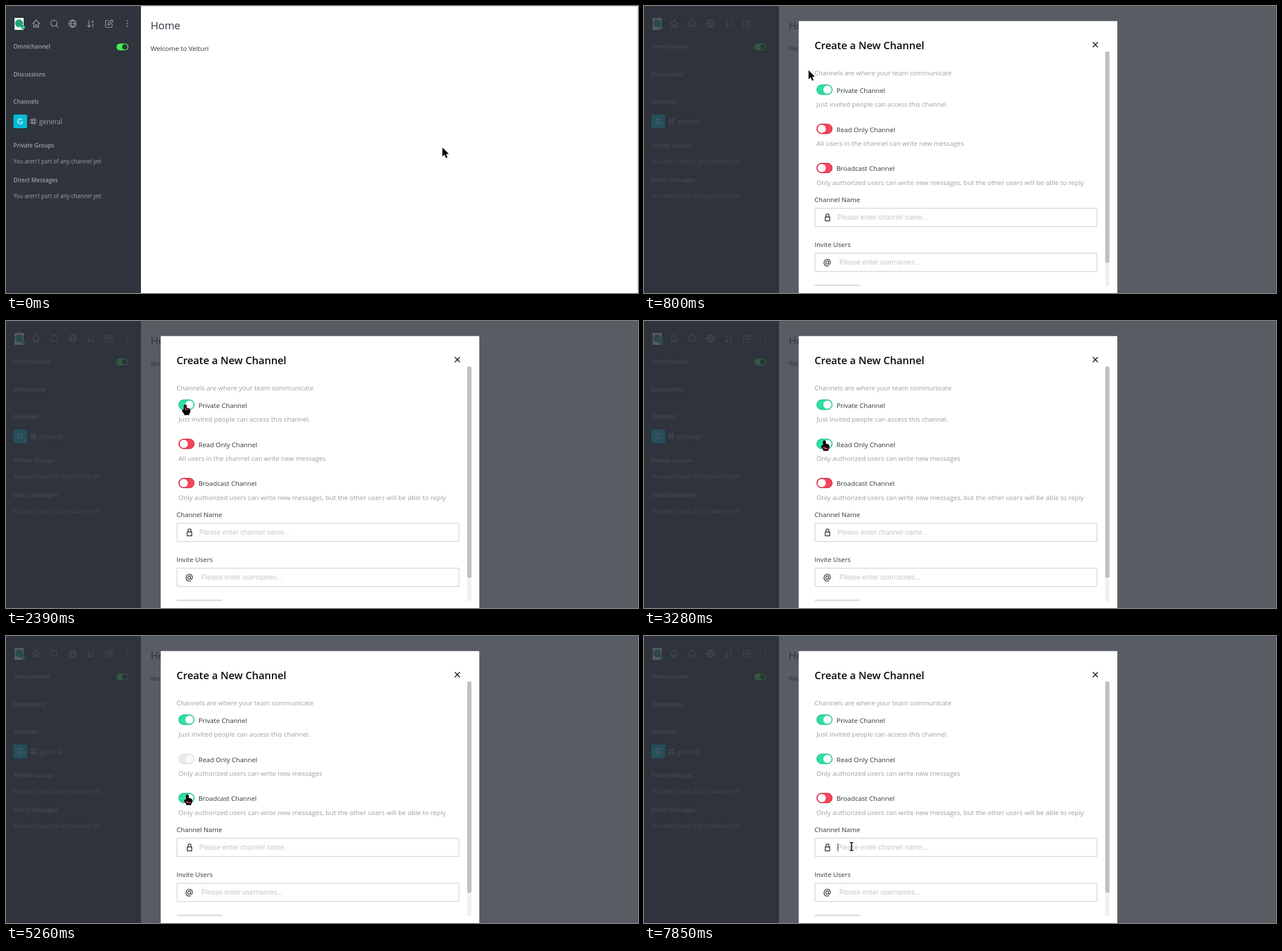
These frames come from a looping animation (1110 px wide and 505 px high, 8 s). An HTML page with a canvas:

```html
<!DOCTYPE html>
<html lang="en">
<head>
<meta charset="utf-8">
<title>Create a channel</title>
<style>
html, body { margin: 0; width: 100%; height: 100%; overflow: hidden; background: #fff; }
canvas { display: block; }
</style>
</head>
<body>
<canvas id="stage" width="1110" height="505"></canvas>
<script>
const ctx = document.getElementById('stage').getContext('2d');
const LOOP = 8000;
const SANS = '"Open Sans", "Noto Sans", sans-serif';
const ARIAL = '"Liberation Sans", sans-serif';
const DARK = '#2f343d', MUTED = '#9ea2a8', HINT = '#9b9da3';
const GREEN = [45, 224, 165], RED = [245, 69, 92];

// Each step lists only what changes at that time.
const START = { cursor: 'arrow', x: 766.5, y: 249, click: 0, menu: 0, modal: 0,
  priv: 1, read: 0, cast: 0, locked: 0, caret: 0 };
const STEPS = [
  [70, { x: 540, y: 166 }],
  [250, { cursor: 'hand', x: 182, y: 32 }],
  [440, { click: 1, menu: 1 }],
  [620, { x: 214.5, y: 81.5 }],
  [800, { cursor: 'arrow', x: 289, y: 113, click: 0, menu: 0, modal: 1 }],
  [980, { cursor: 'hand', x: 314, y: 147, caret: 1 }],
  [1330, { click: 1, caret: 0 }],
  [1680, { click: 0, priv: 0.4 }],
  [1860, { priv: 0 }],
  [2210, { click: 1 }],
  [2390, { click: 0, priv: 1 }],
  [2570, { x: 316, y: 210 }],
  [2750, { click: 1 }],
  [2930, { click: 0, read: 0.6 }],
  [3110, { read: 1 }],
  [3460, { click: 1 }],
  [3810, { click: 0, read: 0 }],
  [3990, { y: 243 }],
  [4180, { x: 317.5, y: 277 }],
  [4360, { y: 279 }],
  [4570, { click: 1 }],
  [4890, { click: 0, cast: 0.6, read: 1, locked: 1 }],
  [5080, { cast: 1 }],
  [6960, { click: 1 }],
  [7140, { click: 0, cast: 0, locked: 0 }],
  [7320, { cursor: 'beam', x: 352, y: 352 }],
  [7500, { x: 364.5, y: 370.5, click: 1, caret: 1 }],
  [7850, { click: 0 }]
];

function stateAt(time) {
  const state = { ...START };
  for (const [at, change] of STEPS) if (time >= at) Object.assign(state, change);
  return state;
}

function text(str, x, middle, size, color, weight = 400, family = SANS) {
  ctx.font = `${weight} ${size}px ${family}`;
  ctx.fillStyle = color;
  ctx.fillText(str, x, middle + size * 0.36);
}

function rect(x, y, w, h, color, radius = 0) {
  ctx.fillStyle = color;
  ctx.beginPath();
  ctx.roundRect(x, y, w, h, radius);
  ctx.fill();
}

function outline(x, y, w, h, color, width, radius) {
  ctx.strokeStyle = color;
  ctx.lineWidth = width;
  ctx.beginPath();
  ctx.roundRect(x + width / 2, y + width / 2, w - width, h - width, radius);
  ctx.stroke();
}

function disc(x, y, r, color) {
  ctx.fillStyle = color;
  ctx.beginPath();
  ctx.arc(x, y, r, 0, Math.PI * 2);
  ctx.fill();
}

function icon(path, x, y, color = MUTED, width = 1.2) {
  ctx.save();
  ctx.translate(x, y);
  ctx.strokeStyle = color;
  ctx.lineWidth = width;
  ctx.lineCap = ctx.lineJoin = 'round';
  ctx.stroke(new Path2D(path));
  ctx.restore();
}

const ring = (x, y, r) => `M${x - r} ${y}a${r} ${r} 0 1 0 ${2 * r} 0a${r} ${r} 0 1 0 ${-2 * r} 0`;

const ICONS = {
  home: 'M-6 0L0 -6.5L6 0M-4.3 -1V6.5H-1.4V2H1.4V6.5H4.3V-1',
  search: ring(-0.8, -0.8, 5.4) + 'M3.2 3.2L6.5 6.5',
  globe: ring(0, 0, 6.5) + 'M-6.5 0H6.5M0 -6.5C-4 -3 -4 3 0 6.5C4 3 4 -3 0 -6.5',
  sort: 'M-3.3 -6V6M-6 3.3L-3.3 6L-0.7 3.3',
  edit: 'M0 -5.5H-4.5Q-6.3 -5.5 -6.3 -3.7V4.7Q-6.3 6.5 -4.5 6.5H3.5Q5.3 6.5 5.3 4.7V0.5M-2 2.3L-1.4 -0.8L4.6 -6.6L6.9 -4.3L1 1.6Z',
  hash: 'M-2.2 -5.5V5.5M2.2 -5.5V5.5M-5.7 -2.3H5.7M-5.7 2.3H5.7',
  people: ring(0, -0.8, 2) + ring(-3.6, -3.3, 1.6) + ring(3.6, -3.3, 1.6) +
    'M-3.4 5.2Q-3 2 0 2Q3 2 3.4 5.2ZM-5.8 2Q-5.6 -0.6 -3.4 -0.7M5.8 2Q5.6 -0.6 3.4 -0.7',
  bubbles: 'M-2.6 3.4A4.6 4.6 0 1 1 1.5 4L-2.6 4.6ZM-4.2 -0.5Q-6.3 1.5 -5 4L-5.5 6L-3 5.6Q-0.5 6.6 1.2 5',
  lock: 'M-4 -0.8H4V6H-4ZM-2.6 -0.8V-3.5A2.6 2.6 0 0 1 2.6 -3.5V-0.8',
  close: 'M-4 -4L4 4M4 -4L-4 4'
};

function sidebar() {
  rect(0, 0, 237, 505, DARK);
  rect(15, 21, 16, 21, '#fff');
  disc(23, 30.5, 7, '#1fa67a');
  disc(30.5, 37.5, 3.6, DARK);
  disc(30.5, 37.5, 2.8, '#2de0a5');
  ['home', 'search', 'globe', 'sort', 'edit'].forEach((name, i) => icon(ICONS[name], 53 + 32 * i, 31));
  text('A', 150.3, 27.7, 6.5, MUTED, 600);
  text('Z', 150.5, 34.7, 6.5, MUTED, 600);
  for (const dy of [-4.6, 0, 4.6]) disc(213, 31 + dy, 1.1, MUTED);

  text('Omnichannel', 13, 71.5, 10, MUTED, 600);
  rect(194, 66, 21, 12, '#41f04c', 6);
  disc(208.7, 72, 4.8, DARK);
  text('Discussions', 13, 120.5, 10, MUTED, 600);
  text('Channels', 13, 168, 10, MUTED, 600);
  rect(13, 191, 24, 24, '#03bad6', 2);
  text('G', 19.5, 203, 14, '#fff', 400, ARIAL);
  icon(ICONS.hash, 48, 203, MUTED, 1.3);
  text('general', 58, 203.5, 11.7, MUTED);
  for (const [title, y] of [['Private Groups', 245], ['Direct Messages', 306]]) {
    text(title, 13, y, 10, MUTED, 600);
    text("You aren't part of any channel yet", 13, y + 28, 9.9, MUTED);
  }
}

function page() {
  rect(0, 0, 1110, 505, '#fff');
  rect(237, 0, 873, 1, '#cbcdd0');
  rect(1109, 0, 1, 505, '#d4d6d8');
  text('Home', 254, 34.5, 18.4, DARK);
  text('Welcome to Velturi', 254, 75, 11.6, DARK);
  sidebar();
}

function menu() {
  ctx.save();
  ctx.shadowColor = 'rgba(47,52,61,.25)';
  ctx.shadowBlur = 5;
  ctx.shadowOffsetY = 1;
  rect(170, 50, 142, 117, '#fff', 2);
  ctx.restore();
  [['hash', 'Channel'], ['people', 'Direct Messages'], ['bubbles', 'Discussion']].forEach(([name, label], i) => {
    icon(ICONS[name], 193, 79 + 30 * i, DARK, name === 'hash' ? 1.4 : 1);
    text(label, 205, 79.5 + 30 * i, 11.6, DARK);
  });
}

function toggle(y, on, locked) {
  const mix = RED.map((c, i) => c + (GREEN[i] - c) * on);
  const edge = mix.map(c => c * 0.8);
  rect(303, y - 9, 28, 18, locked ? '#ece9ee' : `rgb(${mix})`, 9);
  outline(303, y - 9, 28, 18, locked ? '#dcd8de' : `rgb(${edge})`, 1, 8.5);
  disc(312.2 + 10 * on, y, 7.2, locked ? '#fbf9fb' : '#fff');
}

function option(y, label, note, on, locked) {
  toggle(y, on, locked);
  text(label, 338, y + 1.2, 11.65, DARK);
  text(note, 303, y + 25.4, 11.58, HINT);
}

function field(y, label, hint, x) {
  text(label, 299.5, y - 14.5, 11.6, DARK);
  outline(299.6, y, 496.6, 34, '#dcdde0', 1.75, 1);
  text(hint, x, y + 17, 12.25, '#c5c7cb', 400, ARIAL);
}

function modal(s) {
  rect(0, 0, 1110, 505, 'rgba(47,52,61,.8)');
  rect(271.7, 26.6, 559.6, 480, '#fff', 1);
  text('Create a New Channel', 299.5, 69, 18.1, '#0b0c0f', 600);
  icon(ICONS.close, 792.7, 68, '#111', 1.6);
  text('Channels are where your team communicate', 299.5, 118, 11.5, HINT);

  option(147.3, 'Private Channel',
    s.priv > 0.5 ? 'Just invited people can access this channel.' : 'Everyone can access this channel.', s.priv);
  option(216.2, 'Read Only Channel',
    `${s.read > 0.5 ? 'Only authorized' : 'All'} users ${s.read > 0.5 ? '' : 'in the channel '}can write new messages`,
    s.read, s.locked);
  option(285.1, 'Broadcast Channel',
    'Only authorized users can write new messages, but the other users will be able to reply', s.cast);

  field(355, 'Channel Name', 'Please enter channel name...', 339.5);
  icon(s.priv > 0.5 ? ICONS.lock : ICONS.hash, 322.3, 372, DARK, 1.4);
  if (s.caret) rect(340, 365, 1, 14, '#222');
  field(434, 'Invite Users', 'Please enter usernames...', 343);
  text('@', 314.8, 451, 15.6, DARK, 600);

  rect(300, 490, 79, 3, '#e0dfe5');
  rect(810, 80, 7.5, 413, '#f1f1f1', 2);
  rect(810, 80, 7.5, 372, '#c1c1c1', 3);
}

const ARROW = new Path2D('M0 0V16L3.7 12.6L6.3 18.4L8.9 17.3L6.3 11.6H11.3Z');
const HAND = new Path2D('M-0.8 1.9Q1 -0.1 2.6 1.9V6.5L6 7.2L8.6 8.7Q9.4 10.7 8.6 13.7L7 15.7V17.7H-0.4V16.1L-4 11.5Q-4.2 9.3 -2.4 9.7L-0.8 11.1Z');
const BEAM = 'M-2.5 -7H-0.8L0 -6.2L0.8 -7H2.5M0 -6.2V6.2M-2.5 7H-0.8L0 6.2L0.8 7H2.5';

function cursor(s) {
  if (s.click) disc(s.x, s.y, 10.3, 'rgba(247,230,30,.75)');
  if (s.cursor === 'beam') return icon(BEAM, s.x, s.y, '#000', 1.7);
  ctx.save();
  ctx.translate(s.x, s.y);
  if (s.cursor === 'arrow') {
    ctx.fillStyle = '#000';
    ctx.fill(ARROW);
  } else {
    // The palm shows the inverse of whatever lies below it.
    ctx.globalCompositeOperation = 'difference';
    ctx.fillStyle = '#fff';
    ctx.fill(HAND);
    ctx.globalCompositeOperation = 'source-over';
    ctx.strokeStyle = '#000';
    ctx.lineWidth = 1.7;
    ctx.lineJoin = 'round';
    ctx.stroke(HAND);
  }
  ctx.restore();
}

function draw(now) {
  const state = stateAt(now % LOOP);
  page();
  if (state.menu) menu();
  if (state.modal) modal(state);
  cursor(state);
}

const origin = performance.now();
function tick() {
  draw(performance.now() - origin);
  requestAnimationFrame(tick);
}
tick();
</script>
</body>
</html>
```
